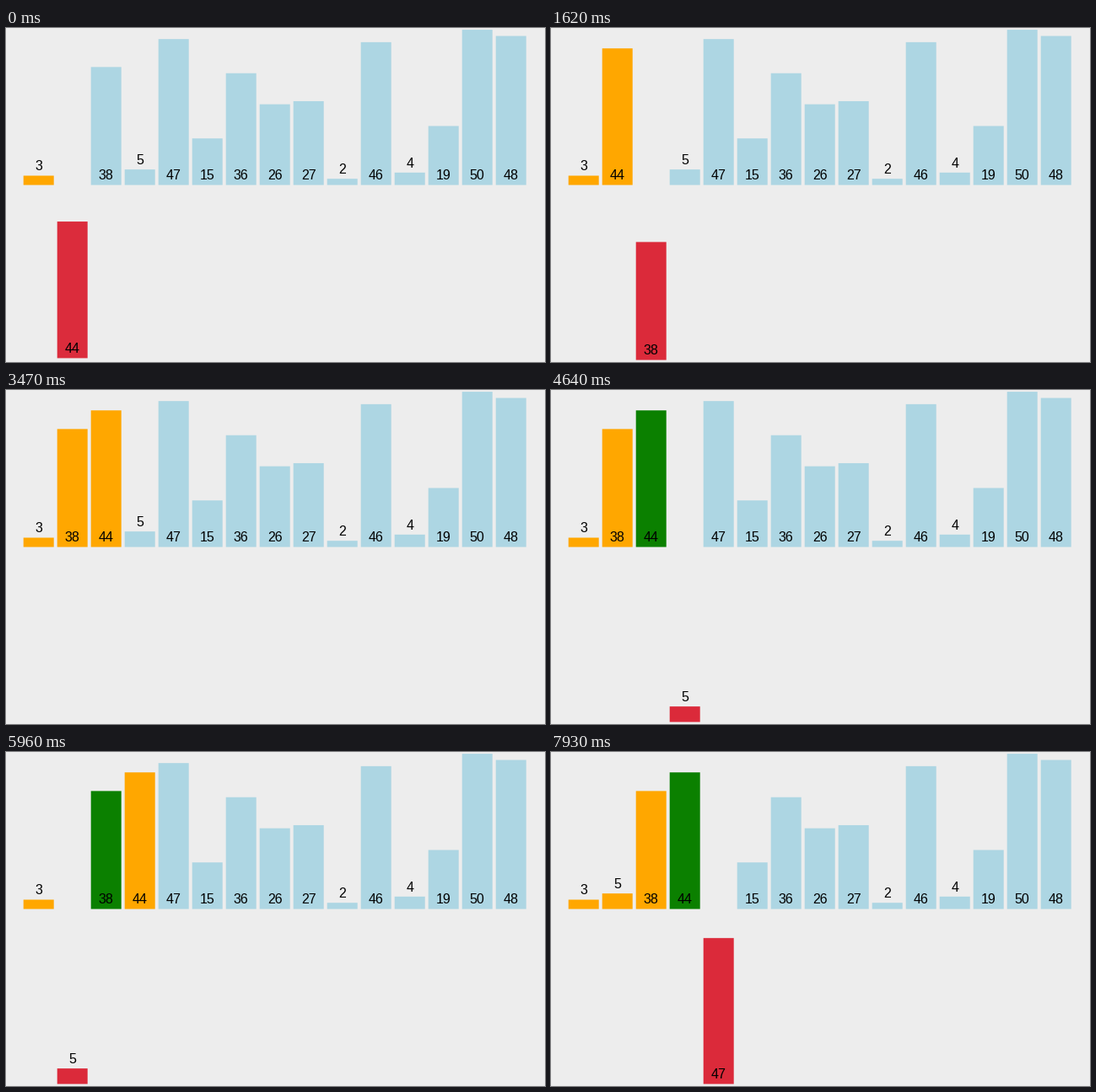
Animation of 639 by 397 pixels, one loop 8 s. Source, as a matplotlib script:

```python
import matplotlib.pyplot as plt
import numpy as np
from matplotlib.animation import FuncAnimation
from matplotlib.colors import to_rgb
from matplotlib.patches import Rectangle

W, H, DPI = 639, 397, 100
LOOP, STEP = 8000, 40

BACK, BLUE, ORANGE = "#ededed", "#add6e3", "#ffa700"
GREEN, RED = "#0b8000", "#db2a3a"

VALUES = [3, 44, 38, 5, 47, 15, 36, 26, 27, 2, 46, 4, 19, 50, 48]
BASE, UNIT = 186.6, 3.69
LEFT, PITCH, BAR = 20.7, 40, 36
DROP = 208
LEAD, SPAN = 50, 58   # each move starts LEAD ms early and lasts SPAN ms


def extract(v):
    return {v: dict(down=1, color=RED)}


def mark(v, prev=None):
    change = {v: dict(color=GREEN)}
    if prev is not None:
        change[prev] = dict(color=ORANGE)
    return change


def shift(v, key, slot):
    return {v: dict(slot=slot), key: dict(slot=slot - 1)}


def insert(key, prev):
    return {key: dict(down=0, color=ORANGE), prev: dict(color=ORANGE)}


# Insertion sort, one entry per step
EVENTS = [
    (0, extract(44)),
    (420, mark(3)),
    (850, insert(44, 3)),
    (1280, extract(38)),
    (1830, mark(44)),
    (2170, shift(44, 38, 2)),
    (2730, mark(3, 44)),
    (3370, insert(38, 3)),
    (3780, extract(5)),
    (4230, mark(44)),
    (4710, shift(44, 5, 3)),
    (5250, mark(38, 44)),
    (5860, shift(38, 5, 2)),
    (6290, mark(3, 38)),
    (6730, insert(5, 3)),
    (7170, extract(47)),
    (7590, mark(44)),
]


def ease(u):
    u = min(max(u, 0), 1)
    return 4 * u**3 if u < 0.5 else 1 - 4 * (1 - u)**3


def state_at(t):
    state = {v: dict(slot=i, down=0, color=np.array(to_rgb(BLUE)))
             for i, v in enumerate(VALUES)}
    state[3]["color"] = np.array(to_rgb(ORANGE))
    for start, changes in EVENTS:
        p = ease((t - start + LEAD) / SPAN)
        if p == 0:
            break
        for v, props in changes.items():
            for name, goal in props.items():
                if name == "color":
                    goal = np.array(to_rgb(goal))
                now = state[v][name]
                state[v][name] = now + (goal - now) * p
    return state


fig = plt.figure(figsize=(W / DPI, H / DPI), dpi=DPI, facecolor=BACK)
ax = fig.add_axes([0, 0, 1, 1])
ax.set_xlim(0, W)
ax.set_ylim(H, 0)
ax.axis("off")

bars, labels = {}, {}
for v in VALUES:
    bars[v] = ax.add_patch(
        Rectangle((0, 0), BAR, v * UNIT, linewidth=0, snap=False))
    labels[v] = ax.text(0, 0, str(v), family="Liberation Sans",
                        fontsize=16 * 72 / DPI, color="black",
                        ha="center", va="baseline", zorder=3)


def draw(i):
    for v, s in state_at(i * STEP).items():
        x = LEFT + PITCH * s["slot"]
        bottom = BASE + DROP * s["down"]
        top = bottom - v * UNIT
        bars[v].set_xy((x, top))
        bars[v].set_facecolor(s["color"])
        labels[v].set_position((x + BAR / 2, (bottom if v > 10 else top) - 6.2))
    return [*bars.values(), *labels.values()]


anim = FuncAnimation(fig, draw, frames=LOOP // STEP, interval=STEP,
                     repeat=True, repeat_delay=0, blit=False)
plt.show()
```
